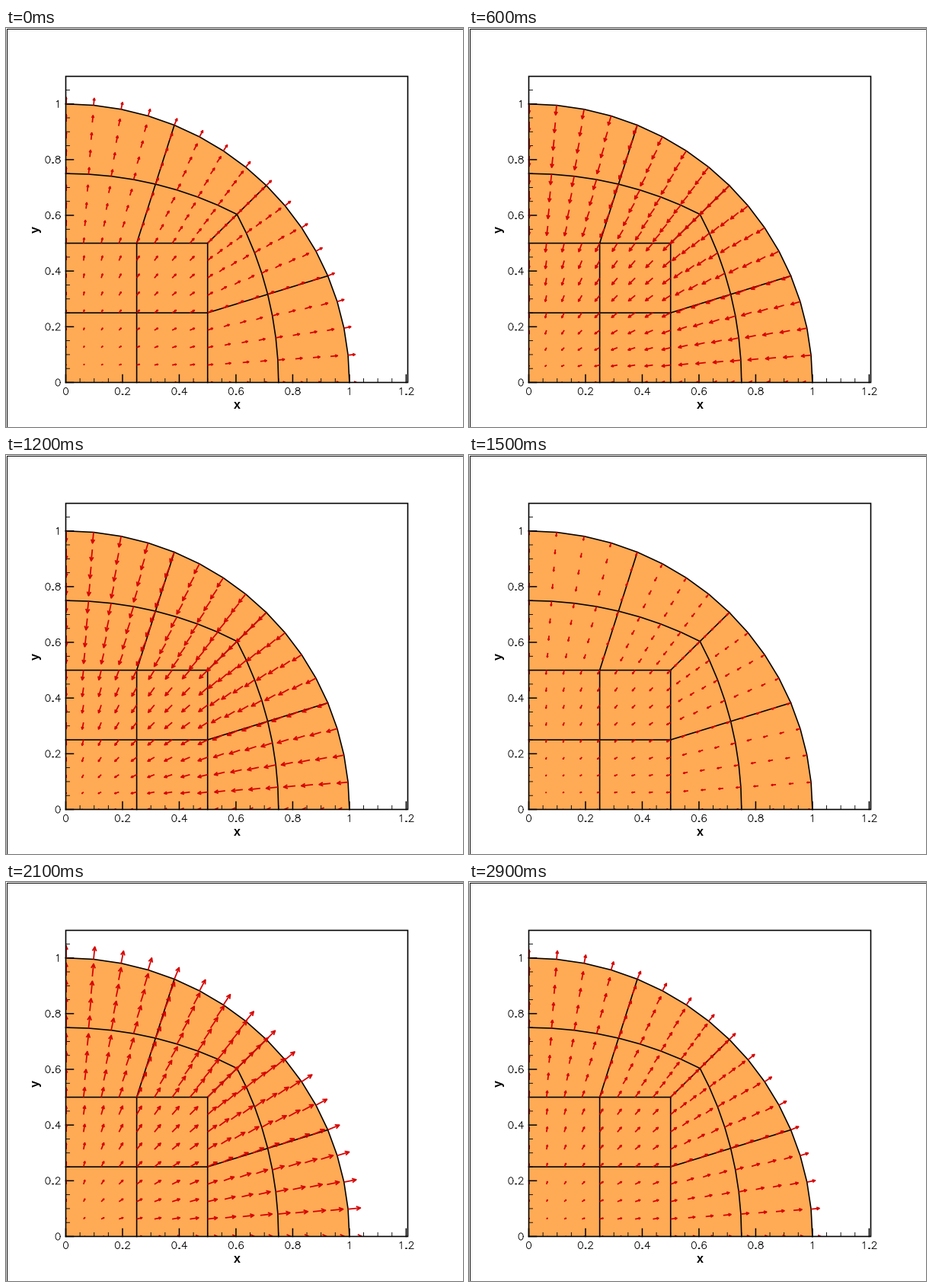
Write a matplotlib script that moves like this. It is 600x524 px and loops after 3000 ms.

```python
import numpy as np
import matplotlib.pyplot as plt
from matplotlib.animation import FuncAnimation
from matplotlib.collections import LineCollection
from matplotlib.patches import Polygon, Rectangle

W, H, DPI = 600, 524, 100
FRAMES, STEP_MS = 30, 100
X0, Y0, SX, SY = 78.5, 465.5, 372.4, 365.8
RIGHT, TOP = 527.5, 63.5
ORANGE, RED = "#ffaa55", "#d60000"
PX = 72 / DPI

fig = plt.figure(figsize=(W / DPI, H / DPI), dpi=DPI, facecolor="white")
ax = fig.add_axes([0, 0, 1, 1])
ax.set_xlim(0, W)
ax.set_ylim(H, 0)
ax.axis("off")


def to_px(p):
    """Data coordinates to stage pixels."""
    return np.asarray(p) * [SX, -SY] + [X0, Y0]


def line(pts, width=1.6, z=2):
    pts = np.asarray(pts)
    ax.plot(pts[:, 0], pts[:, 1], color="black", lw=width * PX, zorder=z,
            snap=False)


# Quarter disc: a square core and two curved blocks blended out to the arc.
def shell(s, t):
    angle = s * np.pi / 4
    inner = np.stack([0.5 * s, 0.5 + 0 * s], axis=-1)
    outer = np.stack([np.sin(angle), np.cos(angle)], axis=-1)
    return (1 - t) * inner + t * outer


S = np.linspace(0, 1, 9)


def draw_disc():
    arc = shell(S, 1)
    rim = np.vstack([[[0, 0]], arc, arc[::-1, ::-1]])
    ax.add_patch(Polygon(to_px(rim), fc=ORANGE, ec="none", zorder=1))
    for flip in (1, -1):
        for t in (0, 0.5, 1):
            line(to_px(shell(S, t)[:, ::flip]))
        spoke = np.array([shell(np.array(0.5), t) for t in (0, 1)])
        line(to_px(spoke[:, ::flip]))
        line(to_px(np.array([[0.25, 0], [0.25, 0.5]])[:, ::flip]))
    line(to_px([shell(np.array(1), t) for t in (0, 1)]))


# Single-stroke digits on a grid 21 units high.
def oval(cx, cy, rx, ry):
    a = np.linspace(0, 2 * np.pi, 25)
    return np.stack([cx + rx * np.cos(a), cy + ry * np.sin(a)], axis=1)


GLYPHS = {
    "0": [oval(10, 10.5, 7, 10.5)],
    "1": [[(6, 17), (8, 18), (11, 21), (11, 0)]],
    "2": [[(4, 16), (5, 19), (8, 21), (12, 21), (15, 19), (16, 17),
           (16, 15), (13, 10), (3, 0), (17, 0)]],
    "4": [[(13, 0), (13, 21), (3, 7), (18, 7)]],
    "6": [[(16, 18), (15, 20), (12, 21), (10, 21), (7, 20), (5, 17),
           (4, 12), (4, 7)], oval(10.5, 6.5, 6.5, 6.5)],
    "8": [oval(10, 17, 6, 4), oval(10, 6.5, 7, 6.5)],
    ".": [[(4.2, 1), (6.2, 1)]],
}


def label(text, x, y, align, scale=0.44):
    advance = [10 if c == "." else 20 for c in text]
    x -= align * sum(advance) * scale
    for char, step in zip(text, advance):
        for stroke in GLYPHS[char]:
            pts = (np.asarray(stroke) - [0, 10.5]) * [scale, -scale]
            line(pts + [x, y], 1.6 if char == "." else 0.9, 6)
        x += step * scale


def draw_frame():
    ax.add_patch(Rectangle((0.5, 0.5), W - 1, H - 1, fc="none", ec="black",
                           lw=PX, zorder=6))
    ax.add_patch(Rectangle((X0, TOP), RIGHT - X0, Y0 - TOP, fc="none",
                           ec="black", lw=1.6 * PX, zorder=6, snap=False))
    for i in range(25):
        major = i % 4 == 0
        size, width = (10, 1.5) if major else (5, 0.9)
        x, y = to_px((i * 0.05, i * 0.05))
        text = f"{i * 0.05:.1f}".removesuffix(".0")
        line([(x, Y0), (x, Y0 - size)], width, 3)
        if major:
            label(text, x, 477, 0.5)
        if y > TOP + 1:
            line([(X0, y), (X0 + size, y)], width, 3)
            if major:
                label(text, 72.5, y, 1)
    title = dict(family="Liberation Sans", weight="bold", size=16 * PX,
                 ha="center", va="center", zorder=6)
    ax.text(303, 495, "x", **title)
    ax.text(39.5, 265, "y", rotation=90, **title)


# Velocity arrows at every grid node.
def grid_nodes():
    core = [(x / 16, y / 16) for x in range(9) for y in range(9)]
    upper = np.vstack([shell(S, t) for t in S[1:]])
    side = np.vstack([shell(S[:-1], t)[:, ::-1] for t in S[1:]])
    return np.vstack([core, upper, side])[1:]


nodes = grid_nodes()
radius = np.hypot(*nodes.T)
radial = nodes / radius[:, None] * [1, -1]
across = radial[:, ::-1] * [-1, 1]
tails = to_px(nodes)

arrows = LineCollection([], colors=RED, linewidths=1.75 * PX, zorder=4)
ax.add_collection(arrows)
arrows.set_clip_path(Rectangle((X0, TOP), RIGHT - X0, Y0 - TOP,
                               transform=ax.transData))


def update(i):
    swing = 18.8 * np.cos(2 * np.pi * (i - 24.1) / 29.5)
    length = swing * np.sin(1.85 * radius) / np.sin(1.85) + 1.5 * radius**2
    shift = length[:, None]
    tips = tails + shift * radial
    neck = tips - 0.33 * shift * radial
    barb = 0.16 * shift * across
    shafts = np.stack([tails, tips], axis=1)
    heads = np.stack([neck + barb, tips, neck - barb], axis=1)
    arrows.set_segments([*shafts, *heads])
    return [arrows]


draw_disc()
draw_frame()
anim = FuncAnimation(fig, update, frames=FRAMES, interval=STEP_MS,
                     repeat=True, repeat_delay=0, blit=False)
plt.show()
```
